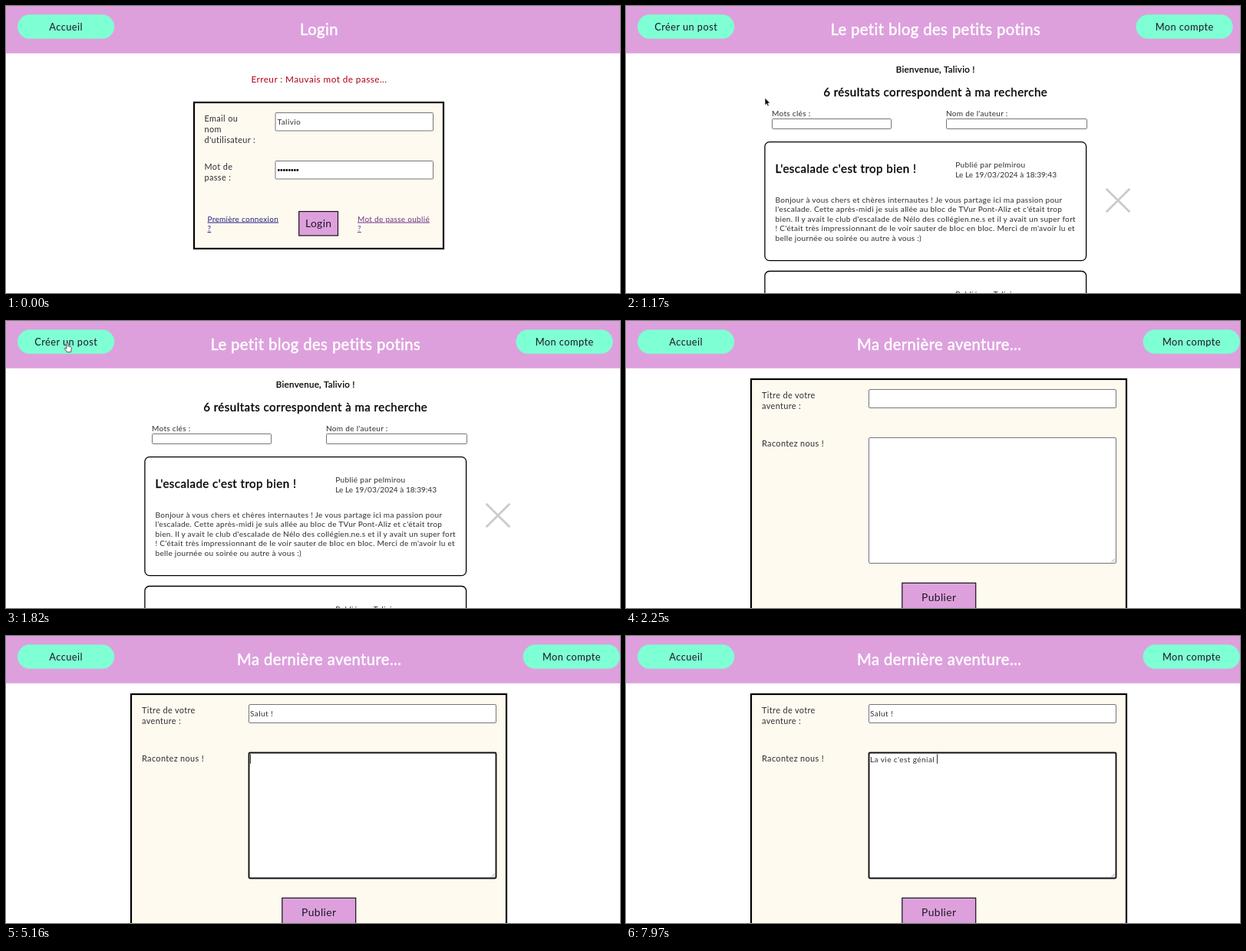
Animation, 800 px wide and 375 px high, one loop 7990 ms. Source, as an HTML page:

```html
<!DOCTYPE html>
<html lang="fr">
<head>
<meta charset="utf-8">
<style>
  html, body { margin: 0; width: 100%; height: 100%; overflow: hidden; background: #fff; }
  svg { display: block; width: 800px; height: 375px; }
  text { font: 10.1px Lato, "Open Sans", sans-serif; letter-spacing: .028em; fill: #302c33; white-space: pre; }
  .title { font-size: 20.2px; letter-spacing: .021em; fill: #fff; stroke: #fff; stroke-width: .5; }
  .h2 { font-size: 15.1px; letter-spacing: .03em; fill: #000; stroke: #000; stroke-width: .35; }
  .h3 { font-size: 11.6px; letter-spacing: .025em; fill: #000; stroke: #000; stroke-width: .25; }
  .nav { font-size: 12.8px; letter-spacing: .035em; fill: #1c1820; }
  .submit { font-size: 13.8px; fill: #1c1820; }
  .label { font-size: 10.9px; letter-spacing: .034em; }
  .error { font-size: 11.8px; letter-spacing: .036em; fill: #b00018; }
  .link { font-size: 10px; letter-spacing: .03em; fill: #22207c; text-decoration: underline; }
  .seen { fill: #6a3585; }
  .date { letter-spacing: 0; }
  .typed { letter-spacing: .039em; fill: #333; }
  .mid { text-anchor: middle; }
  .panel { fill: #fffaf0; stroke: #000; stroke-width: 2.2; }
  .card { fill: #fff; stroke: #000; stroke-width: 1.3; }
  .field { fill: #fff; stroke: #767676; stroke-width: 1; }
  .focus { stroke: #101010; stroke-width: 1.9; }
  .btn { fill: #dda0dd; stroke: #151015; stroke-width: 1.2; }
  .caret { fill: #000; }
</style>
</head>
<body>
<svg id="stage" viewBox="0 0 800 375"></svg>
<script>
const LOOP = 7990;
const stage = document.getElementById('stage');

function el(parent, tag, attrs, content) {
  const node = document.createElementNS('http://www.w3.org/2000/svg', tag);
  for (const key in attrs) node.setAttribute(key, attrs[key]);
  if (content !== undefined) node.textContent = content;
  parent.appendChild(node);
  return node;
}
const text = (p, x, y, str, cls = '') => el(p, 'text', { x, y, class: cls }, str);
const box = (p, cls, x1, y1, x2, y2, rx = 0) =>
  el(p, 'rect', { class: cls, x: x1, y: y1, width: x2 - x1, height: y2 - y1, rx });
const path = (p, d, fill, stroke, width) =>
  el(p, 'path', { d, fill, stroke, 'stroke-width': width, 'stroke-linejoin': 'round' });
const show = (node, on) => node.setAttribute('visibility', on ? 'inherit' : 'hidden');

function navButton(p, x, label) {
  el(p, 'rect', { x, y: 11.3, width: 126.2, height: 31.5, rx: 15.75, fill: '#7fffd4' });
  text(p, x + 63.2, 32, label, 'nav mid');
}

function page(title, x, left, right, rightX) {
  const g = el(stage, 'g', {});
  el(g, 'rect', { width: 800, height: 61.8, fill: '#dda0dd' });
  text(g, x, 37.5, title, 'title mid');
  navButton(g, 15, left);
  if (right) navButton(g, rightX, right);
  return g;
}

// Login page
const login = page('Login', 408, 'Accueil');
text(login, 408, 99.5, 'Erreur : Mauvais mot de passe...', 'error mid');
box(login, 'panel', 245, 126, 570, 317);
['Email ou', 'nom', "d'utilisateur :"].forEach((s, i) => text(login, 258.5, 151 + i * 13.8, s, 'label'));
['Mot de', 'passe :'].forEach((s, i) => text(login, 258.5, 214 + i * 13.8, s, 'label'));
box(login, 'field', 351, 139.5, 556.5, 163, 1);
box(login, 'field', 351, 202.5, 556.5, 226, 1);
text(login, 353.5, 155, 'Talivio', 'typed');
for (let i = 0; i < 8; i++) el(login, 'circle', { cx: 355.3 + i * 3.5, cy: 214.5, r: 1.4 });
['Première connexion', '?'].forEach((s, i) => text(login, 262.5, 281.5 + i * 12.6, s, 'link'));
['Mot de passe oublié', '?'].forEach((s, i) => text(login, 458, 281.5 + i * 12.6, s, 'link seen'));
box(login, 'btn', 381.7, 268.5, 432.5, 300);
text(login, 407.2, 289.3, 'Login', 'submit mid');

// Blog page
const blog = page('Le petit blog des petits potins', 403.3, 'Créer un post', 'Mon compte', 664.5);
text(blog, 403.3, 87, 'Bienvenue, Talivio !', 'h3 mid');
text(blog, 403.2, 117.8, '6 résultats correspondent à ma recherche', 'h2 mid');
text(blog, 190, 144, 'Mots clés :');
text(blog, 417, 144, "Nom de l'auteur :");
box(blog, 'field', 190.5, 147.5, 345.5, 160.5, 1);
box(blog, 'field', 417.5, 147.5, 600.5, 160.5, 1);
box(blog, 'card', 180.9, 177.6, 599.6, 332.6, 6);
box(blog, 'card', 180.9, 346.5, 599.6, 500, 6);
text(blog, 194.5, 218, "L'escalade c'est trop bien !", 'h2');
text(blog, 429.3, 211, 'Publié par pelmirou');
text(blog, 429.3, 223.8, 'Le Le 19/03/2024 à 18:39:43', 'date');
text(blog, 429.3, 380, 'Publié par Talivio');
[
  'Bonjour à vous chers et chères internautes ! Je vous partage ici ma passion pour',
  "l'escalade. Cette après-midi je suis allée au bloc de TVur Pont-Aliz et c'était trop",
  "bien. Il y avait le club d'escalade de Nélo des collégien.ne.s et il y avait un super fort",
  "! C'était très impressionnant de le voir sauter de bloc en bloc. Merci de m'avoir lu et",
  'belle journée ou soirée ou autre à vous :)'
].forEach((s, i) => text(blog, 194.5, 256.6 + i * 12.55, s));
path(blog, 'M625.7 238.7L656.3 269.3M656.3 238.7L625.7 269.3', 'none', '#cbcbcb', 2.8);

// Post form
const form = page('Ma dernière aventure...', 408.3, 'Accueil', 'Mon compte', 673.7);
box(form, 'panel', 163, 76, 652, 400);
text(form, 177, 101, 'Titre de votre', 'label');
text(form, 177, 114.8, 'aventure :', 'label');
text(form, 177, 163.8, 'Racontez nous !', 'label');

function field(y1, y2, baseline, caretY) {
  const frame = box(form, 'field', 316.5, y1, 638.5, y2, 1.5);
  return {
    frame,
    typed: text(form, 318, baseline, '', 'typed'),
    caret: el(form, 'rect', { class: 'caret', y: caretY, width: 0.8, height: 12.5 })
  };
}
const subject = field(89.5, 113.5, 105, 95.2);
const story = field(152.5, 316.5, 164.5, 154.3);
path(form, 'M632.5 315L637 310.5M635.3 315L637 313.3', 'none', '#777', 0.7);
box(form, 'btn', 359.8, 342.3, 455.7, 380);
text(form, 407.7, 365.5, 'Publier', 'submit mid');

// Pointers, hot spot at 0,0
const pointers = {
  arrow: path(stage, 'M0 0V9.6L2.2 7.6L3.7 11L5.3 10.3L3.8 7H6.7Z', '#000', '#fff', 0.7),
  hand: path(stage, 'M-1 1Q0 -.6 1 1V5L4.6 5.8Q5.6 6.2 5.4 7.5L4.6 12.6H-.6L-3.6 8.4Q-3.6 7 -2.2 7.4L-1 8.4Z',
    '#fff', '#333', 0.8),
  beam: path(stage, 'M-2.4 -5H-.6L0 -4.4L.6 -5H2.4M0 -4.4V4.4M-2.4 5H-.6L0 4.4L.6 5H2.4', 'none', '#555', 0.9)
};

// start, end, steps, from x, y, to x, y, shape while moving, shape at rest
const moves = [
  [110, 500, 5, 470, 345, 408, 282, 'arrow', 'hand'],
  [970, 1420, 6, 408, 282, 87, 53, 'arrow', 'arrow'],
  [1620, 1820, 4, 87, 53, 80, 28, 'hand', 'hand'],
  [2310, 2770, 7, 80, 28, 376, 107, 'arrow', 'beam'],
  [3150, 3150, 1, 376, 107, 376, 109.5, 'beam', 'beam']
];
const hidden = [[0, 110], [2200, 2310], [5160, LOOP]];

const spread = (a, b, n) => Array.from({ length: n }, (_, i) => a + (b - a) * i / (n - 1));
const subjectKeys = [3480, 3680, 3780, ...spread(3980, 4220, 4)];
const storyKeys = [5450, 5590, 5690, ...spread(5850, 6270, 5), 6480, 6660, 6810, 6990, 7080,
  ...spread(7230, 7440, 3), 7650, 7760, 7920, 7970];

function drawPointer(t) {
  const off = hidden.some(([a, b]) => t >= a && t < b);
  const move = moves.filter(m => t >= m[0]).pop();
  let shape = '';
  if (move && !off) {
    const [a, b, n, x0, y0, x1, y1, going, rest] = move;
    const step = t >= b ? n : Math.floor((t - a) / (b - a) * (n - 1)) + 1;
    const k = Math.sin(step / n * Math.PI / 2);
    shape = step === n ? rest : going;
    pointers[shape].setAttribute('transform', `translate(${x0 + (x1 - x0) * k} ${y0 + (y1 - y0) * k})`);
  }
  for (const name in pointers) show(pointers[name], name === shape);
}

function drawField(f, str, keys, t, focused, caretOn) {
  const value = str.slice(0, keys.filter(k => t >= k).length).replace(/ /g, '\u00a0');
  if (f.typed.textContent !== value) f.typed.textContent = value;
  f.frame.setAttribute('class', focused ? 'field focus' : 'field');
  f.caret.setAttribute('x', 318.1 + (value ? f.typed.getComputedTextLength() : 0));
  show(f.caret, focused && caretOn);
}

function draw() {
  const t = performance.now() % LOOP;
  show(login, t < 600);
  show(blog, t >= 600 && t < 2200);
  show(form, t >= 2200);
  if (t >= 2200) {
    drawField(subject, 'Salut !', subjectKeys, t, t >= 2920 && t < 4710, t < 4550);
    drawField(story, "La vie c'est génial ", storyKeys, t, t >= 4710, t < 5310 || t >= 5450);
  } else {
    show(subject.caret, false);
    show(story.caret, false);
  }
  drawPointer(t);
  requestAnimationFrame(draw);
}
draw();
</script>
</body>
</html>
```
